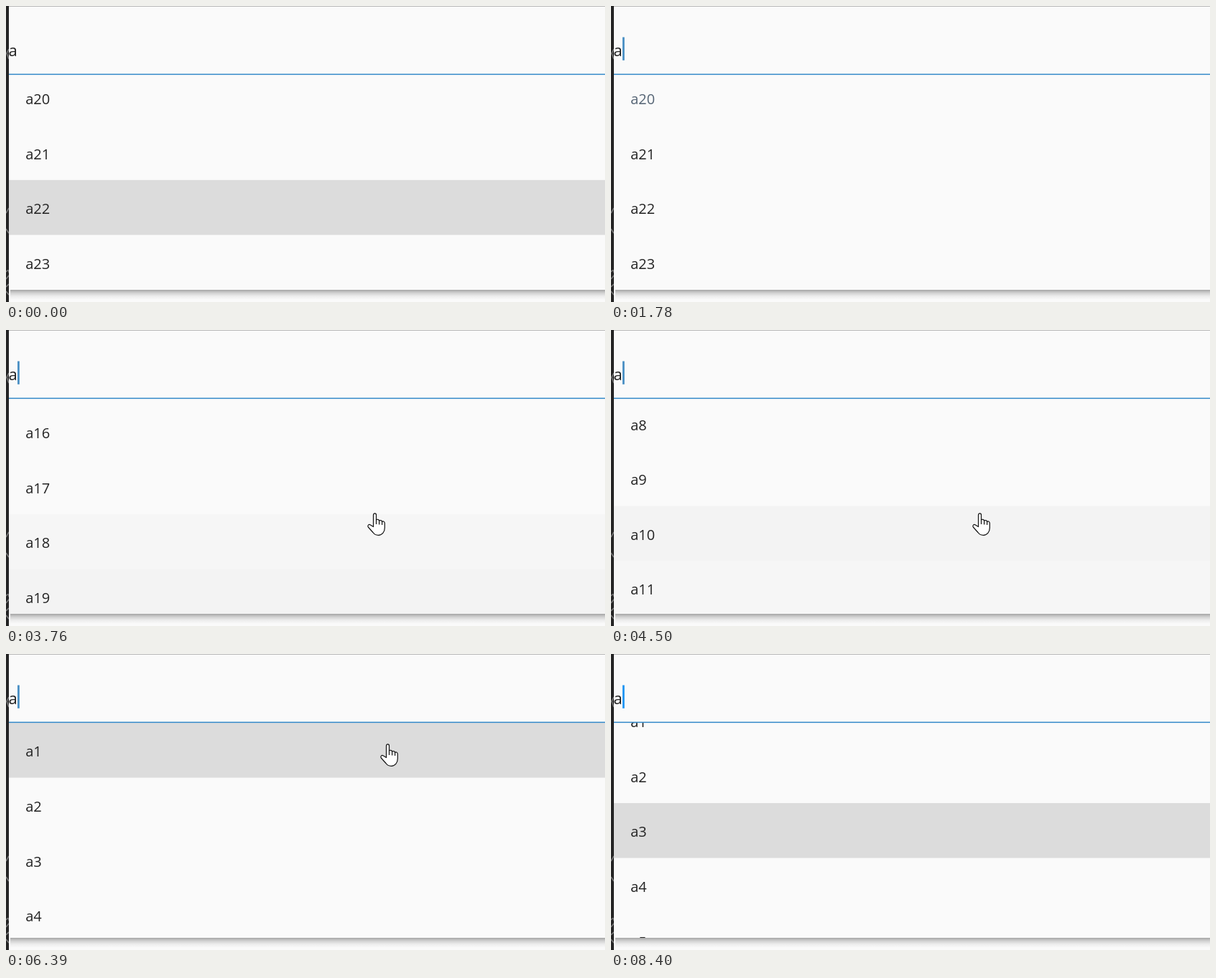
These frames come from a looping animation (834 by 413 pixels, 8460 ms). An HTML page with a canvas:

```html
<!DOCTYPE html>
<html lang="en">
<head>
<meta charset="utf-8">
<title>Autocomplete list</title>
<style>
html, body { margin: 0; width: 100%; height: 100%; overflow: hidden; background: #fafafa; }
canvas { display: block; }
</style>
</head>
<body>
<canvas id="stage" width="834" height="413"></canvas>
<script>
const ctx = document.getElementById('stage').getContext('2d');
const LOOP = 8460, W = 834, H = 413;
const LEFT = 4, TOP = 96, BOTTOM = 396, ROW = 76.6, ROWS = 23;
const MAX_SCROLL = ROWS * ROW - (BOTTOM - TOP);
const FONT = '"Open Sans", "Noto Sans", sans-serif';

// Times at which the caret toggles, starting hidden
const BLINKS = [460, 920, 1380, 1910, 2370, 2900, 3360, 3900, 4370,
  4900, 5370, 5910, 6390, 6920, 7380, 7920, 8400];

// [time, offset]
const SCROLL = [[3230, MAX_SCROLL], [3360, 1380], [3490, 1380], [3560, 1294],
  [3690, 1217], [3750, 1141], [3770, 1141], [4300, 660], [4860, 300], [4945, 0]];

// [time, x, y]
const POINTER = [[2900, 762, 126], [3020, 705, 156], [3180, 580, 222], [3330, 503, 255],
  [5630, 503, 255], [5700, 509, 264], [5790, 551, 210], [5880, 544, 142], [5970, 521, 125],
  [7640, 521, 125], [7800, 600, 170], [7950, 700, 290], [8050, 742, 384], [8120, 742, 402]];

const HAND = new Path2D('M8.5 19.5V3.2C8.5 .2 12.5 .2 12.5 3.2V10C13.4 8.8 16.3 9 16.6 11.2' +
  'C17.6 10 20.2 10.4 20.6 12.6C22 11.3 24.3 12.2 24.3 14.6V21C24.3 27 20.5 31.3 15.5 31.3' +
  'C12 31.3 9.6 30 8 27.5L1.3 20C-.2 17.6 2.2 15.6 4.4 17Z');
const KNUCKLES = new Path2D('M12.5 9.5V15.5M16.6 11V16M20.6 12.5V16.5');
const MARGIN_BITS = new Path2D('M4 60L1 66L4 74M0 289L4 282M0 311L4 317' +
  'M0 371Q4 366 4 372M0 381L4 376M0 392L4 388M0 398L4 403');

function track(keys, t, col) {
  if (t <= keys[0][0]) return keys[0][col];
  for (let i = 1; i < keys.length; i++) {
    const a = keys[i - 1], b = keys[i];
    if (t <= b[0]) return a[col] + (b[col] - a[col]) * (t - a[0]) / (b[0] - a[0]);
  }
  return keys[keys.length - 1][col];
}

// Motion is sampled fifteen times a second
const sample = t => Math.floor((t - 20) / (1000 / 15)) * 1000 / 15 + 20;
const scrollAt = t => t >= 6920 ? 41.2 : track(SCROLL, t, 1);
const pointerShown = t => t >= 2900 && t < 8130;

function hoveredRow(t) {
  if (!pointerShown(t)) return 0;
  const y = track(POINTER, t, 2) + 3;
  if (y < TOP || y >= BOTTOM) return 0;
  return Math.floor((y - TOP + scrollAt(t)) / ROW) + 1;
}

// Fraction of the last 200 ms the pointer spent over each row
function hoverLevels(t) {
  const levels = {};
  for (let k = 0; k < 20; k++) {
    const row = hoveredRow(t - k * 10);
    levels[row] = (levels[row] || 0) + 0.05;
  }
  return levels;
}

function selectedRow(t) {
  if (t < 1250) return 22;
  if (t < 1780) return 23;
  if (t < 6590) return 1;
  return t < 6920 ? 2 : 3;
}

function box(color, x, y, w, h) {
  ctx.fillStyle = color;
  ctx.fillRect(x, y, w, h);
}

function label(text, x, y, size, color) {
  ctx.font = size + 'px ' + FONT;
  ctx.fillStyle = color;
  ctx.fillText(text, x, y);
}

function drawFrame() {
  box('#fafafa', 0, 0, W, H);
  box('#242424', 0, 0, LEFT, H);
  ctx.save();
  ctx.beginPath();
  ctx.rect(0, 0, LEFT, H);
  ctx.clip();
  ctx.strokeStyle = '#777';
  ctx.lineWidth = 1.6;
  ctx.stroke(MARGIN_BITS);
  ctx.restore();
  box('#b8b8b8', LEFT, 0, W, 1);

  const shade = ctx.createLinearGradient(0, BOTTOM, 0, BOTTOM + 14);
  shade.addColorStop(0, 'rgba(0,0,0,.34)');
  shade.addColorStop(0.3, 'rgba(0,0,0,.17)');
  shade.addColorStop(0.65, 'rgba(0,0,0,.05)');
  shade.addColorStop(1, 'rgba(0,0,0,0)');
  box(shade, LEFT + 2, BOTTOM, W, 14);
}

function drawList(t) {
  const scroll = scrollAt(t >= 6920 ? t : sample(t));
  const levels = hoverLevels(t), selected = selectedRow(t);
  ctx.save();
  ctx.beginPath();
  ctx.rect(LEFT, TOP, W, BOTTOM - TOP);
  ctx.clip();
  for (let n = 1; n <= ROWS; n++) {
    const y = TOP + (n - 1) * ROW - scroll;
    if (y > BOTTOM || y + ROW < TOP) continue;
    if (n === selected) box('#dcdcdc', LEFT, y, W, ROW);
    else if (levels[n]) box(`rgba(0,0,0,${0.044 * levels[n]})`, LEFT, y, W, ROW);
    const muted = n === 20 && t >= 460 && t < 3230;
    label('a' + n, 27.2, Math.round(y + 47.3), 20, muted ? '#566575' : '#242424');
  }
  ctx.restore();
}

function drawField(t) {
  label('a', 3.4, 70, 22, '#202020');
  box('#3389c8', LEFT, 94.6, W, 1.5);
  if (BLINKS.filter(b => b <= t).length % 2) {
    box(t >= 8400 ? '#2196f3' : '#4a90c4', 16, 43.5, 2.8, 32.3);
  }
}

function drawPointer(t) {
  if (!pointerShown(t)) return;
  const s = sample(t);
  ctx.save();
  ctx.translate(track(POINTER, s, 1), track(POINTER, s, 2));
  ctx.fillStyle = '#fff';
  ctx.fill(HAND);
  ctx.strokeStyle = '#111';
  ctx.lineWidth = 1.2;
  ctx.lineJoin = ctx.lineCap = 'round';
  ctx.stroke(HAND);
  ctx.stroke(KNUCKLES);
  ctx.restore();
}

function draw() {
  const t = performance.now() % LOOP;
  drawFrame();
  drawList(t);
  drawField(t);
  drawPointer(t);
  requestAnimationFrame(draw);
}
draw();
</script>
</body>
</html>
```
